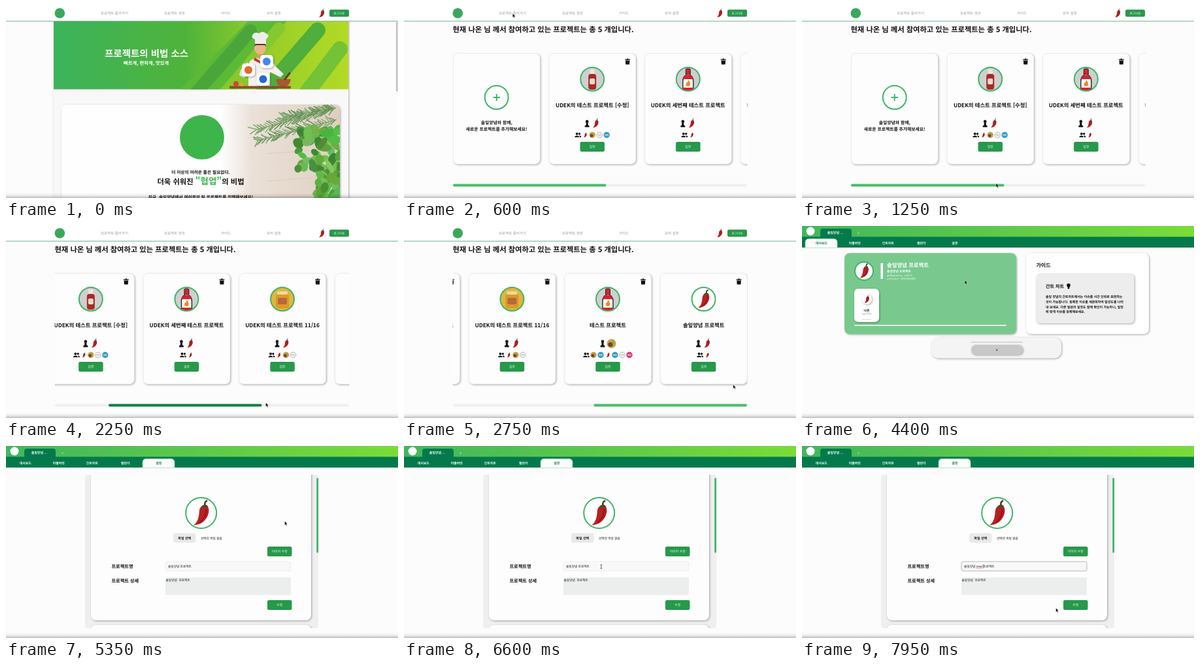
These frames come from a looping animation (600 by 294 pixels, 8000 ms). An HTML page:

```html
<!DOCTYPE html>
<html lang="ko">
<head>
<meta charset="utf-8">
<style>
html, body { margin: 0; width: 100%; height: 100%; overflow: hidden; background: #fcfcfc; }
svg { display: block; width: 100vw; height: 100vh; }
text { font-family: "Noto Sans CJK KR", "Noto Sans CJK JP", "Noto Sans", sans-serif; white-space: pre; text-rendering: geometricPrecision; }
.sh { filter: drop-shadow(1px 1.5px 1.5px #0005); }
</style>
</head>
<body>
<svg id="stage" viewBox="0 0 600 294"></svg>
<script>
const LOOP = 8000;
const BRAND = '솔잎양념', TEAM = 'UDEK', USER = '나온';
const GREEN = '#27994a', RING = '#3db565', DEEP = '#047a4c', INK = '#111';
const PITCH = 146.6, SCROLL = 416, TRAVEL = 215.5;

const rect = (x, y, w, h, r, fill, more = '') =>
  `<rect x="${x}" y="${y}" width="${w}" height="${h}" rx="${r}" fill="${fill}" ${more}/>`;
const circle = (x, y, r, fill, more = '') => `<circle cx="${x}" cy="${y}" r="${r}" fill="${fill}" ${more}/>`;
const path = (d, fill, more = '') => `<path d="${d}" fill="${fill}" ${more}/>`;
const line = (d, color, w, more = '') => path(d, 'none', `stroke="${color}" stroke-width="${w}" ${more}`);
const text = (x, y, size, str, fill = INK, weight = 400, anchor = 'start') =>
  `<text x="${x}" y="${y}" font-size="${size}" fill="${fill}" font-weight="${weight}" text-anchor="${anchor}">${str}</text>`;
const mid = (x, y, size, str, fill, weight) => text(x, y, size, str, fill, weight, 'middle');
const group = (x, y, s, body) => `<g transform="translate(${x} ${y}) scale(${s})">${body}</g>`;
const ring = (x, y, r, fill) => circle(x, y, r, fill, `stroke="${RING}" stroke-width="2"`);
const button = (x, y, w, h, label, size) =>
  rect(x, y, w, h, 2.5, GREEN) + mid(x + w / 2, y + h / 2 + size * .36, size, label, '#fff');

let seed = 7;
const rand = (a, b) => a + (b - a) * ((seed = seed * 16807 % 2147483647) / 2147483647);

const chili = (x, y, s) => group(x, y, `${s * .88} ${s}`,
  path('M1-4.4C4-6 6-3 5 0C4 4 0 7-5 7C-1.6 5-1.4 1-1.2-1C-1-3 0-4 1-4.4Z', '#b82020') +
  line('M3.4-2.6C3.8 1 1.5 4-1 5.4', '#8d1520', .8) +
  path('M.2-3.6C1-5.6 4-5.6 4.8-3.8L3-3Z', '#4d4a2c') +
  line('M2.6-4.8C2.3-6 3-7 4.2-7.4', '#4b3a2c', 1.1));

// ---------- pictures inside the project circles ----------
const ketchup = rect(-6, -8, 12, 24, 4, '#a82a26') + rect(-3.5, -15, 7, 7, 1, '#e9e6e1') +
  rect(-4, -1, 8, 9, 2, '#e8dccb');
const hotSauce = path('M-3-9H3V-6C7-4 8-1 8 3V18H-8V3C-8-1-7-4-3-6Z', '#fff', 'stroke="#222" stroke-width="1.4"') +
  path('M-3-6H3C7-4 8-1 7.4 0H-7.4C-8-1-7-4-3-6Z', '#d8232e') + rect(-8, 13, 16, 6, 0, '#d8232e') +
  rect(-3.5, -16, 7, 9, 1.5, '#d8232e', 'stroke="#222"') +
  path('M0 1C5 6 4 11 0 11C-4 11-4 7-2 5C-1 5 0 4 0 1Z', '#f08a24');
const jar = rect(-19, -19, 38, 38, 0, '#e0b63c') + rect(-10, -8, 20, 22, 4, '#d99a2b') +
  rect(-8, -12, 16, 5, 1, '#f2d9a0') + rect(-7, -2, 14, 10, 2, '#b9683a');

const trash = (x, y) => group(x, y, 1, path('M-4-3.5H-1.5L-1-4.5H1L1.5-3.5H4V-2.3H-4ZM-3.3-1.5H3.3L2.9 4.5H-2.9Z', INK));
const pawn = (x, y) => group(x, y, 1,
  circle(0, -3.2, 2.3, INK) + path('M-2.4-1.3H2.4L1.3 0L2 3H3.4V5.5H-3.4V3H-2L-1.3 0Z', INK));
const people = (x, y) => group(x, y, 1,
  circle(-1.5, -1.8, 1.9, INK) + circle(2.4, -1.8, 1.6, INK) +
  path('M-5 3.5C-5 0 2 0 2 3.5ZM2.8 3.5C2.8 2 2.4 1.2 1.8.8C4 .5 5 2 5 3.5Z', INK));
const avatars = {
  c: (x, y) => chili(x, y, .55),
  p: (x, y) => circle(x, y, 4.7, '#c9a24a') + circle(x - 1, y + 1, 2.4, '#7b3f33') + circle(x + 1.8, y - 1.5, 1.6, '#7fae4b'),
  g: (x, y) => circle(x, y, 4.4, '#eee', 'stroke="#999" stroke-width=".6"') + line(`M${x - 2.5} ${y}h5`, '#aaa', .8),
  b: (x, y) => circle(x, y, 4.7, '#2f9fd0') + rect(x - 3, y - 1, 6, 2, 1, '#e6d08a'),
  m: (x, y) => circle(x, y, 4.7, '#d63a78') + rect(x - 3, y - 1, 6, 2, 1, '#f3b6cf')
};

const projects = [
  [TEAM + '의 테스트 프로젝트 [수정]', ketchup, 'cpgb'],
  [TEAM + '의 세번째 테스트 프로젝트', hotSauce, 'c'],
  [TEAM + '의 테스트 프로젝트 11/16', jar, 'cpg'],
  ['테스트 프로젝트', hotSauce, 'pbcbgm'],
  [BRAND + ' 프로젝트', null, 'c']
];

// ---------- shared page parts ----------
const menuBar = rect(0, 0, 600, 23, 0, '#fff') + line('M0 23.2H600', '#6fb08f', 1) +
  circle(82.3, 11, 7.8, '#3aa85a') +
  [[145, '프로젝트 들어가기'], [242, '프로젝트 생성'], [329, '가이드'], [399, '유저 설정']]
    .map(([x, s]) => text(x, 12.8, 5.5, s, '#999')).join('') +
  chili(483, 11, .9) + button(495, 5.5, 30, 11, '로그아웃', 4.6);

const tabs = ['대시보드', '미들버킷', '간트차트', '캘린더', '설정'];
const workBar = on => rect(0, 0, 600, 17, 0, 'url(#lime)') + rect(0, 16.5, 600, 16.5, 0, DEEP) +
  path('M28 17V8Q28 4 32 4H72Q76 4 76 8V17Z', DEEP) + circle(13, 8, 6.5, '#fff') +
  mid(51, 12, 5, BRAND + ' ...', '#fff', 700) + mid(86.5, 12.7, 5.5, '+', '#fff') +
  path(`M${on * 51 + 5} 33.5V25Q${on * 51 + 5} 19.5 ${on * 51 + 11} 19.5H${on * 51 + 48}Q${on * 51 + 54} 19.5 ${on * 51 + 54} 25V33.5Z`,
    '#fcfcfc', 'stroke="#8fd4a8" stroke-width=".6"') +
  tabs.map((s, i) => mid(i * 51 + 29.7, 28.3, 4.9, s, i === on ? DEEP : '#fff', 700)).join('');

// ---------- home ----------
function banner() {
  const tile = (x, y, color) => rect(x - 10, y - 10, 20, 20, 5, '#fff', 'class="sh"') + circle(x, y, 6, color);
  const bar = (d, color, w) => line(d, color, w, 'stroke-linecap="round"');
  return rect(73, 23, 451, 104.5, 0, 'url(#banner)') + '<g clip-path="url(#bannerClip)">' +
    path('M267 128L371 23H430L326 128Z', '#5cb935') +
    bar('M285 140L374 38', '#4ba63a', 20) + bar('M330 140L418 34', '#86c92e', 18) +
    bar('M388 140L477 37', '#4fae3c', 24) + bar('M455 140L511 66', '#74c236', 24) + '</g>' +
    path('M371 125V92Q371 80 389 79Q407 80 412 92L425 104L420 109L404 101V125Z', '#f4f1ee') +
    path('M370 86Q360 90 357 106L364 110L374 100Z', '#e8e3df') +
    rect(385, 70, 8, 11, 3, '#d99b74') + path('M381 79L389 84L397 79L399 83L389 88L379 83Z', '#c9362f') +
    circle(389, 65, 9, '#eab48c') + path('M380 62Q380 56 389 56Q398 56 398 62L396 60H382Z', '#5a3426') +
    path('M381 58V51Q374 49 378 43Q382 39 387 42Q393 37 398 42Q405 45 398 51V58Z', '#ededed') +
    path('M413 112H436Q434 124 424 124Q415 124 413 112Z', '#a8582f') + line('M427 112L434 103', '#6e3a22', 3, 'stroke-linecap="round"') +
    rect(342, 122.5, 94, 4, 1, '#8a4f2c') + circle(352, 119, 4, '#d8432f') + circle(361, 120, 3, '#e9a13a') +
    tile(371, 98, '#e8662a') + tile(399, 85, '#4285f4') + tile(393.5, 112, '#2069d8') +
    text(151, 77.5, 14.5, '프로젝트의 비법 소스', '#fff', 900) +
    text(180, 90.3, 7.3, '빠르게, 편하게, 맛있게', '#fff', 700);
}
function herbs() {
  let out = rect(330, 151, 181, 150, 0, 'url(#wood)');
  for (const y of [178, 226, 268]) out += line(`M400 ${y}L511 ${y - 8}`, '#d9c8b9', .8);
  for (const [x, y, dx, dy] of [[384, 189, 120, -32], [386, 206, 120, -32], [425, 170, 80, -14]]) {
    out += line(`M${x} ${y}l${dx} ${dy}`, '#6b7f4c', 1);
    for (let i = 0; i < 1; i += .035) {
      const px = x + dx * i, py = y + dy * i;
      out += line(`M${px} ${py}l${rand(-14, -6)} ${rand(-8, -3)}M${px} ${py}l${rand(-13, -5)} ${rand(6, 11)}`,
        `hsl(105 25% ${rand(42, 62)}%)`, 1.5);
    }
  }
  for (let i = 0; i < 90; i++) {
    const y = rand(190, 300), x = rand(y < 250 ? 446 : 478, 514), a = rand(0, 180);
    out += `<ellipse cx="${x}" cy="${y}" rx="${rand(6, 12)}" ry="${rand(4, 7)}" transform="rotate(${a} ${x} ${y})" fill="hsl(${rand(95, 118)} ${rand(38, 52)}% ${rand(36, 58)}%)"/>`;
  }
  return out;
}
const home = rect(73, 20, 451, 290, 0, '#f8f8f8', 'class="sh"') + banner() +
  rect(85, 151, 426, 160, 7, '#fefefe', 'class="sh"') +
  `<g clip-path="url(#photoClip)">${herbs()}</g>` + circle(300, 201, 34, '#3db54a') +
  mid(298, 257.3, 6.7, '더 이상의 어려운 툴은 필요없다.', INK, 700) +
  mid(298, 273, 11.3, '더욱 쉬워진 <tspan font-size="13.5" fill="#3db54a">"협업"</tspan>의 비법', INK, 700) +
  mid(298, 295.3, 6.65, `지금, ${BRAND}에서 여러분의 팀 프로젝트를 진행해보세요!`, INK, 700) +
  menuBar + rect(597, 24, 2.6, 107, 1.3, '#c2c2c2');

// ---------- project list ----------
const shell = x => rect(x, 73, 132.5, 169, 7, '#fdfdfd', 'class="sh" stroke="#eee" stroke-width=".5"');
function projectCard([title, pic, team], i) {
  const x = 75.6 + (i + 1) * PITCH, c = x + 66, start = c - team.length * 5.5;
  return shell(x) + trash(x + 120, 85) + circle(c, 112, 18, pic ? '#cfcfcf' : '#fff') +
    (pic ? `<g transform="translate(${c} 112)" clip-path="url(#disc)">${pic}</g>` : chili(c, 112, 1.9)) +
    ring(c, 112, 18, 'none') + mid(c, 155, 8.3, title, INK, 700) + pawn(x + 58, 180) +
    (i === 3 ? group(x + 71.5, 180, 1.5, avatars.p(0, 0)) : chili(x + 71, 179.5, .95)) +
    people(start, 197.5) + [...team].map((k, n) => avatars[k](start + 11 * (n + 1), 197.5)).join('') +
    button(x + 47.3, 208, 37.5, 15, '입장', 4.9);
}
const list = menuBar + text(74.5, 40, 11.27, `현재 ${USER} 님 께서 참여하고 있는 프로젝트는 총 5 개입니다.`, INK, 700) +
  '<g clip-path="url(#listClip)"><g id="cards">' + shell(75.6) + ring(141.7, 140, 18, 'none') +
  line('M136.5 140H147M141.7 134.8V145.2', RING, 2) +
  mid(141.7, 181, 6.8, BRAND + '와 함께,', INK, 700) + mid(141.7, 191, 6.8, '새로운 프로젝트를 추가해보세요!', INK, 700) +
  projects.map(projectCard).join('') + '</g></g>' +
  rect(75, 272.5, 450, 4, 2, '#efefef') + rect(75, 272.5, 234.5, 4, 2, '#4bbd68', 'id="thumb"');

// ---------- dashboard ----------
const guide = [`${BRAND.slice(0, 2)} ${BRAND.slice(2)}의 간트차트에서는 이슈를 시간 단위로 표현하는`,
  '것이 가능합니다. 등록한 이슈를 세분화하여 달성도를 나타', '내 보세요. 다른 팀원의 일정도 함께 확인이 가능하니, 일정', '에 맞게 이슈를 등록해보세요.'];
const dash = workBar(0) + rect(65, 41.5, 263, 124, 8, '#79c98e', 'class="sh"') +
  ring(95, 69, 14, '#fff') + chili(95, 69, 1.5) + rect(120.5, 57, 3.5, 24, 0, '#fff') +
  text(130, 63, 8.4, BRAND + ' 프로젝트', '#fff', 700) + text(130, 71.3, 4.8, BRAND + ' 프로젝트', '#fff', 700) +
  `<g font-style="italic">${text(130, 76.5, 3.7, 'gitRepository : 204197', '#fff')}${text(130, 81.7, 3.7, 'jiraProject : DEMOBOARD', '#fff')}</g>` +
  rect(80, 96, 38, 51, 6, '#fff', 'class="sh"') + circle(99, 112, 8, '#fff', 'class="sh"') + chili(99, 112, .85) +
  mid(99, 131, 4.9, USER, INK, 700) + mid(99, 135.8, 3.8, 'MASTER', '#999') + rect(91.5, 142.5, 15, 1.2, .6, '#ddd') +
  rect(80, 151.5, 233, 1.6, .8, '#fff') +
  rect(343, 41.5, 188, 124, 8, '#fff', 'class="sh"') + text(358.5, 62.8, 8, '가이드', INK, 700) +
  rect(358.5, 73, 150, 76, 6, '#ededed', 'class="sh"') + text(373, 94.8, 7.1, '간트 차트', INK, 700) +
  circle(408, 90.8, 2.8, INK) + rect(406.6, 93, 2.8, 3.2, .6, INK) +
  guide.map((s, i) => text(373, 110.3 + i * 7.6, 4.95, s, INK, 700)).join('') +
  rect(198, 170.5, 199, 32, 11, '#f4f4f4', 'class="sh"') + rect(259, 177.3, 79, 1.3, .6, '#c6c6c6') +
  rect(259, 182, 79, 15, 7, '#c8c8c8', 'class="sh"') + mid(298, 191.5, 5.5, '+', INK, 700);

// ---------- settings ----------
const settings = workBar(4) + '<g clip-path="url(#paneClip)">' + rect(121, 44, 357, 235, 0, '#efefef') +
  rect(130, 30, 337, 237, 8, '#fdfdfd', 'class="sh"') + rect(130, 274, 337, 40, 8, '#fdfdfd', 'class="sh"') + '</g>' +
  rect(475.3, 49, 2.8, 114.5, 1.2, RING) +
  ring(298.7, 102.5, 23.5, '#fff') + chili(298.5, 103, 2.6) +
  rect(256, 133.5, 34.5, 14.5, 4, '#e9e9e9') + mid(273.2, 142.6, 5, '파일 선택', INK, 700) +
  text(298, 142.5, 4.7, '선택된 파일 없음') + button(400, 154, 37.5, 15, '이미지 수정', 4.9) +
  text(161.5, 187, 7.2, '프로젝트명', INK, 700) + text(161.5, 209, 7.2, '프로젝트 상세', INK, 700) +
  rect(244, 177, 192, 14.3, 3, '#f8f8f8', 'id="field" stroke-width=".7"') +
  `<text id="entry" x="248" y="186" font-size="4.7" fill="${INK}"></text>` +
  line('', '#e03030', .6, 'id="squiggle" stroke-dasharray="1 .3"') + line('', INK, .5, 'id="caret"') +
  rect(244, 201.3, 192, 27, 1, '#eceeed') + text(244.5, 206.6, 4.7, BRAND + '  프로젝트') +
  button(400, 236, 37.5, 15, '수정', 4.9);

const clip = (id, body) => `<clipPath id="${id}">${body}</clipPath>`;
const fade = (id, stops, more = '') => `<linearGradient id="${id}" ${more}>` +
  stops.map(([o, c]) => `<stop offset="${o}" stop-color="${c}"/>`).join('') + '</linearGradient>';
const $ = id => document.getElementById(id);

$('stage').innerHTML = '<defs>' +
  clip('bannerClip', rect(73, 23, 451, 104.5, 0, INK)) + clip('photoClip', rect(85, 151, 426, 160, 7, INK)) +
  clip('listClip', rect(74.5, 60, 451, 195, 0, INK)) + clip('paneClip', rect(121, 44, 357, 235, 4, INK)) +
  clip('disc', circle(0, 0, 18, INK)) +
  fade('lime', [[0, '#41b65e'], [1, '#7bdc37']]) +
  fade('banner', [[0, '#3cb35c'], [.45, '#4fb33a'], [.7, '#93cd2a'], [1, '#b4da24']]) +
  fade('wood', [[0, '#fefefe'], [.25, '#ebe1d8'], [1, '#dfcfc1']]) +
  fade('dock', [[0, '#0000'], [.5, '#00000010'], [1, '#00000040']], 'x2="0" y2="1"') + '</defs>' +
  rect(0, 0, 600, 294, 0, '#fcfcfc') +
  Object.entries({ home, list, dash, settings }).map(([id, body]) => `<g id="${id}">${body}</g>`).join('') +
  rect(0, 286, 600, 8, 0, 'url(#dock)') +
  '<g id="pointer">' +
  path('M0 0V6.2L1.5 4.9L2.5 7.2L3.6 6.7L2.6 4.5H4.5Z', '#000', 'id="arrow" stroke="#fff" stroke-width=".5"') +
  path('M-.7 0Q0-.8.7 0V2.6L4 3.4Q4.6 5.5 3.2 7.5H-.8L-2.8 4.3Q-2 3.5-.7 4.6Z', '#fff', 'id="hand" stroke="#000" stroke-width=".7"') +
  line('M-1.2-3Q0-3 0-2V2Q0 3-1.2 3M1.2-3Q0-3 0-2M0 2Q0 3 1.2 3', '#000', .6, 'id="beam"') + '</g>';

// ---------- motion ----------
const route = [[0, 300, 300], [100, 285, 280], [450, 166, 11], [600, 166, 11], [1250, 297, 271.5], [1650, 303, 272],
  [2250, 397, 270.5], [2500, 536, 273], [2750, 504, 243], [2980, 459, 215], [3400, 459, 215], [3650, 242, 117.5],
  [4200, 262, 130], [4650, 233, 25], [4800, 233, 25], [5350, 426.5, 115], [5900, 426, 150], [6250, 320, 185],
  [6450, 320, 185], [6900, 266, 184], [7500, 266, 184], [7950, 388.5, 248]];
const drag = [[1650, 0], [2250, 81.5], [2500, TRAVEL]];
const scenes = [['home', 0], ['list', 550], ['dash', 3100], ['settings', 4750]];

function at(keys, t, k = 1) {
  const i = keys.findIndex(p => p[0] > t);
  if (i < 0) return keys[keys.length - 1][k];
  if (!i) return keys[0][k];
  const a = keys[i - 1], b = keys[i];
  return a[k] + (b[k] - a[k]) * (t - a[0]) / (b[0] - a[0]);
}
const within = (t, ...spans) => spans.some(([a, b]) => t >= a && t < b);
const show = (id, on) => $(id).style.display = on ? '' : 'none';

function draw(t) {
  scenes.forEach(([id, from], i) => show(id, t >= from && t < (scenes[i + 1] || [0, LOOP])[1]));

  const shift = at(drag, t);
  $('cards').setAttribute('transform', `translate(${-shift * SCROLL / TRAVEL} 0)`);
  $('thumb').setAttribute('x', 75 + shift);
  $('thumb').setAttribute('fill', within(t, [1600, 2600]) ? '#0d7f45' : '#4bbd68');

  const focus = t >= 6950;
  const typed = 'new '.slice(0, Math.max(0, Math.floor((t - 7150) / 50)));
  const entry = $('entry'), head = BRAND.length + 1;
  const str = BRAND + ' ' + typed + '프로젝트';
  if (entry.textContent !== str) entry.textContent = str;
  $('field').setAttribute('stroke', focus ? '#999' : '#e8e8e8');
  show('caret', focus);
  show('squiggle', typed.length === 4);
  if (focus) {
    const edge = n => 248 + entry.getSubStringLength(0, n);
    $('caret').setAttribute('d', `M${edge(head + typed.length)} 181V187.3`);
    $('squiggle').setAttribute('d', `M${edge(head)} 187.2H${edge(head + 3)}`);
  }

  const hand = within(t, [400, 600], [2920, 3100], [3560, 4400], [4600, 4850]);
  const beam = within(t, [6200, 7530]);
  show('pointer', !within(t, [7150, 7500]));
  show('hand', hand);
  show('beam', beam);
  show('arrow', !hand && !beam);
  $('pointer').setAttribute('transform', `translate(${at(route, t)} ${at(route, t, 2)})`);
}

const begin = performance.now();
function tick() {
  draw((performance.now() - begin) % LOOP);
  requestAnimationFrame(tick);
}
tick();
</script>
</body>
</html>
```
